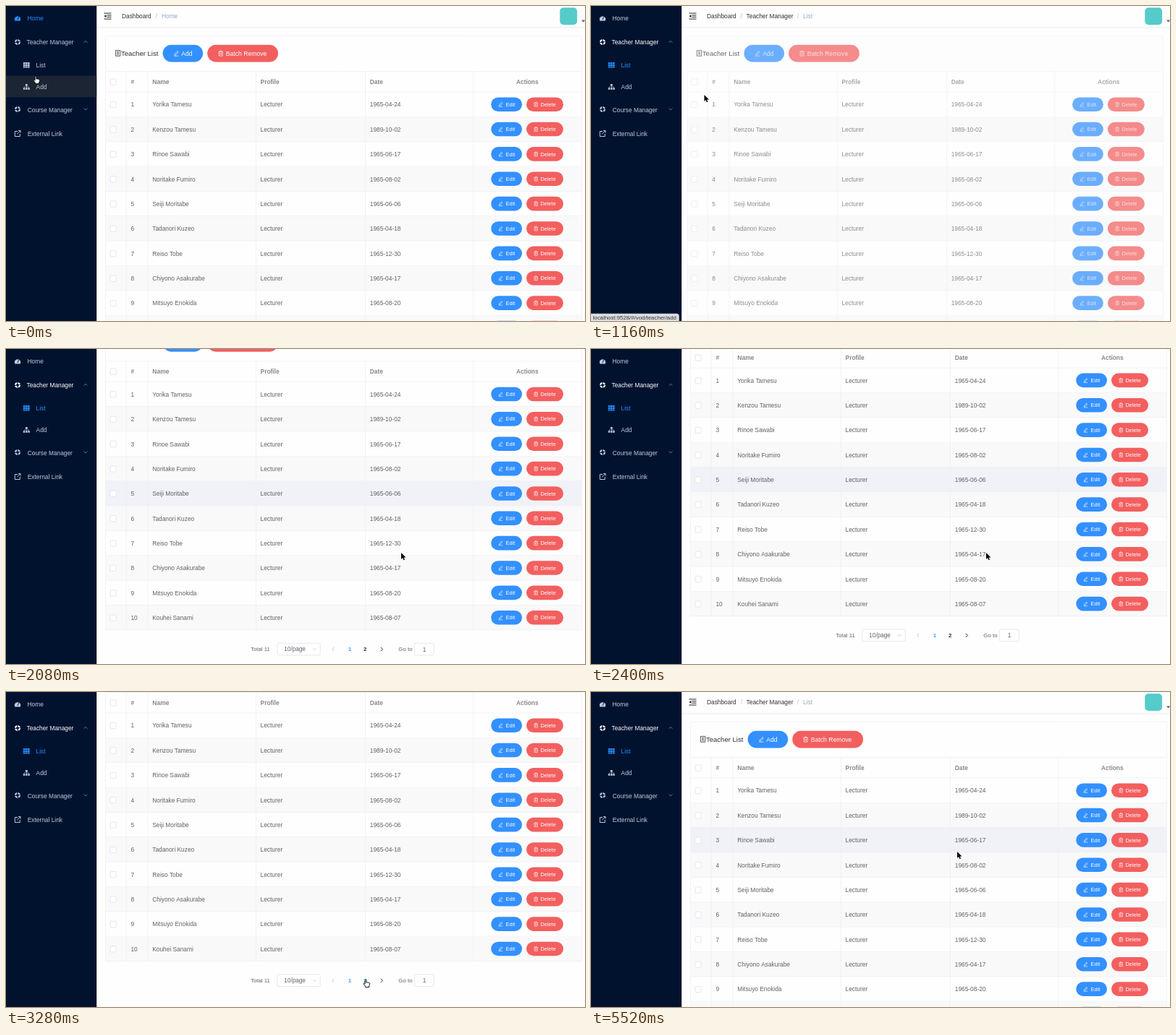
Recreate the animation shown at these times as an HTML page with a canvas. Size 800 px wide and 436 px high, loop 5.56 s.

```html
<!DOCTYPE html>
<html lang="en">
<head>
<meta charset="utf-8">
<title>Teacher list</title>
<style>
html, body { margin: 0; width: 800px; height: 436px; overflow: hidden; background: #fefefe; }
canvas { display: block; width: 800px; height: 436px; }
</style>
</head>
<body>
<canvas id="stage"></canvas>
<script>
const stage = document.getElementById('stage');
const g = stage.getContext('2d');
const ratio = window.devicePixelRatio || 1;
stage.width = 800 * ratio;
stage.height = 436 * ratio;

const LOOP = 5560;
const BLUE = '#3390ff', RED = '#f35f5f', ACTIVE = '#2490ff';
const MENU = '#01122f', MENU_HOVER = '#1b2533', MENU_TEXT = '#bfcbd9';
const LINE = '#ebeef5', BODY = '#606266', MUTED = '#97a8be', DARK = '#303133';
const ROW_TOP = 119.3, ROW_H = 34.36;
const CLICK_MENU = 450, FADE = 500, SHIFT = 17.9;
const PAGE2_CLICK = 3440, PAGE2_READY = 3560, PAGE1_CLICK = 5010, PAGE1_READY = 5110;
const SCROLL_START = 1850, SCROLL_IDLE = 2440;

const people = [
  ['Yorika Tamesu', '1965-04-24'], ['Kenzou Tamesu', '1989-10-02'],
  ['Rinoe Sawabi', '1965-06-17'], ['Noritake Fumiro', '1965-08-02'],
  ['Seiji Moritabe', '1965-06-06'], ['Tadanori Kuzeo', '1965-04-18'],
  ['Reiso Tobe', '1965-12-30'], ['Chiyono Asakurabe', '1965-04-17'],
  ['Mitsuyo Enokida', '1965-08-20'], ['Kouhei Sanami', '1965-08-07'],
  ['Wataru Ikezomi', '1965-04-26']
];

// Keyframes: time, then values.
const cursorKeys = [
  [0, 41, 97], [300, 48, 86], [1000, 48, 86], [1480, 462, 227], [1720, 546, 282],
  [2440, 546, 282], [2800, 505, 402], [3080, 497, 398], [3600, 497, 398],
  [4200, 473, 178], [5160, 473, 178], [5520, 506, 221]
];
const scrollKeys = [[SCROLL_START, 0], [2180, 94], [2280, 94], [2620, 90]];

const icons = {
  gauge: 'M-4 3.4A4.5 4.5 0 1 1 4 3.4Z',
  ring: 'M3 0A3 3 0 1 1 -3 0A3 3 0 1 1 3 0',
  grid: 'M-4.5-4h2.7v2.2h-2.7zM-1.4-4h2.7v2.2h-2.7zM1.7-4h2.7v2.2h-2.7z' +
    'M-4.5-1.3h2.7v2.2h-2.7zM-1.4-1.3h2.7v2.2h-2.7zM1.7-1.3h2.7v2.2h-2.7z' +
    'M-4.5 1.4h2.7v2.2h-2.7zM-1.4 1.4h2.7v2.2h-2.7zM1.7 1.4h2.7v2.2h-2.7z',
  tree: 'M-1.4-4h2.8v2.8h-2.8zM-4.5 1.3h2.5v2.5h-2.5zM-1.2 1.3h2.5v2.5h-2.5zM2 1.3h2.5v2.5h-2.5z' +
    'M-.3-1.2h.6v2.5h-.6zM-3.5-.3h7v.6h-7zM-3.5-.3h.6v1.6h-.6zM2.9-.3h.6v1.6h-.6z',
  link: 'M0-3H-3.7V4H3.3V.5M1-4H4V-1M4-4L-.7 .7',
  fold: 'M-5-4H5M-1-1.3H5M-1 1.3H5M-5 4H5',
  foldTip: 'M-5 0l3-2v4z',
  edit: 'M-2.2 1L1.8-3.4L3.3-2L-.7 2.3L-2.6 2.8ZM-3.4 4H3.6',
  trash: 'M-3.5-2.4H3.5M-1.2-2.4V-3.8H1.2V-2.4M-2.7-2.4V3.8H2.7V-2.4M-.8-.6V2M.8-.6V2',
  doc: 'M-3.2-3.9H3.2V3.9H-3.2ZM-1.6-1.8H1.6M-1.6 0H1.6M-1.6 1.8H1.6',
  up: 'M-2.5 1.2L0-1.2L2.5 1.2', down: 'M-2.5-1.2L0 1.2L2.5-1.2',
  left: 'M1.2-2.6L-1.4 0L1.2 2.6', right: 'M-1.2-2.6L1.4 0L-1.2 2.6',
  caret: 'M-2.5-1.4H2.5L0 1.6Z',
  arrow: 'M0 0V9L2.1 7.1L3.5 10.2L5 9.5L3.6 6.5H6.5Z',
  hand: 'M-.9 .7C-.9-.3 .9-.3 .9 .7V4L2.4 3.9L3.9 4.3L5.2 4.9C6 5.4 5.6 7.2 4.6 9V10.6H-.4V9.4' +
    'L-2.9 6.2C-3.4 5.3-2.3 4.7-1.7 5.4L-.9 6.2Z'
};
for (const k in icons) icons[k] = new Path2D(icons[k]);

const clamp = v => Math.min(1, Math.max(0, v));

function track(keys, t) {
  const i = keys.findIndex(k => k[0] > t);
  if (i === 0) return keys[0].slice(1);
  if (i < 0) return keys[keys.length - 1].slice(1);
  const a = keys[i - 1], b = keys[i];
  const p = (t - a[0]) / (b[0] - a[0]), s = p * p * (3 - 2 * p);
  return a.slice(1).map((v, j) => v + (b[j + 1] - v) * s);
}

// CSS "ease", cubic-bezier(.25, .1, .25, 1).
function ease(x) {
  x = clamp(x);
  let lo = 0, hi = 1, u = 0.5;
  const bez = (p, q) => 3 * p * u * (1 - u) ** 2 + 3 * q * u * u * (1 - u) + u ** 3;
  for (let i = 0; i < 20; i++) {
    u = (lo + hi) / 2;
    if (bez(0.25, 0.25) < x) lo = u; else hi = u;
  }
  return bez(0.1, 1);
}

function text(s, x, y, color = BODY, size = 8.33, weight = '', align = 'left') {
  g.font = `${weight} ${size}px "Liberation Sans", Arial, sans-serif`;
  g.textAlign = align;
  g.fillStyle = color;
  g.fillText(s, x, y + size * 0.36);
}

function icon(name, x, y, color, { scale = 1, fill = false, width = 0.8, dash = [] } = {}) {
  g.save();
  g.translate(x, y);
  g.scale(scale, scale);
  g.fillStyle = g.strokeStyle = color;
  g.lineWidth = width;
  g.setLineDash(dash);
  if (fill) g.fill(icons[name]); else g.stroke(icons[name]);
  g.restore();
}

function rect(x, y, w, h, color) {
  g.fillStyle = color;
  g.fillRect(x, y, w, h);
}

function box(x, y, w, h, r, fill, stroke) {
  g.beginPath();
  g.roundRect(x, y, w, h, r);
  if (fill) { g.fillStyle = fill; g.fill(); }
  if (stroke) { g.strokeStyle = stroke; g.lineWidth = 0.7; g.stroke(); }
}

function button(label, glyph, x, y, w, h, color, iconX, textX, size) {
  box(x, y - h / 2, w, h, h / 2, color);
  icon(glyph, iconX, y, '#fff', { scale: size / 9.5 });
  text(label, textX, y, '#fff', size);
}

function withAlpha(alpha, dx, draw) {
  g.save();
  g.globalAlpha = alpha;
  g.translate(dx, 0);
  draw();
  g.restore();
}

function drawNavbar(t) {
  rect(125, 29.3, 675, 0.8, '#e9ebee');
  rect(125, 30.1, 675, 1.4, '#f8f9fa');
  icon('fold', 140.5, 14, '#222', { width: 1.1 });
  icon('foldTip', 140.5, 14, '#222', { fill: true });
  box(765.3, 2.2, 23.8, 23.8, 5, '#55cbca');
  icon('caret', 797.6, 21, '#5a5e66', { fill: true });

  const slash = x => text('/', x, 14.5, '#b4bac4', 8.33, '', 'center');
  text('Dashboard', 160, 14.5, DARK);
  slash(208);
  if (t < CLICK_MENU) {
    text('Home', 215, 14.5, MUTED);
    return;
  }
  const e = ease((t - CLICK_MENU) / FADE), leaving = t < CLICK_MENU + FADE;
  withAlpha(e, 11.9 * (1 - e), () => {
    text('Teacher Manager', 214.6, 14.5, DARK);
    slash(286);
    text('List', 293, 14.5, MUTED);
    if (leaving) slash(313);
  });
  if (leaving) withAlpha(1 - e, 11.9 * e, () => text('Home', 309, 14.5, MUTED));
}

function drawRow(id, i, hovered) {
  const top = ROW_TOP + i * ROW_H, y = top + 17.2;
  const [name, date] = people[id];
  if (hovered || i % 2) rect(137.5, top, 658, ROW_H, hovered ? '#f0f2f8' : '#f9f9f9');
  rect(137.5, top + ROW_H - 0.7, 658, 0.7, LINE);
  box(144, y - 4, 8.2, 8.2, 1, '#fff', '#dcdfe6');
  text(id + 1, 172.4, y);
  text(name, 202.3, y);
  text('Lecturer', 351.6, y);
  text(date, 502.8, y);
  button('Edit', 'edit', 670.2, y - 0.3, 42.8, 19.6, BLUE, 683.3, 690.6, 7.3);
  button('Delete', 'trash', 719, y - 0.3, 51, 19.6, RED, 732.2, 738.6, 7.3);
}

function drawPager(s) {
  const y = s.pagerY, on = '#409eff', ink = DARK, off = '#c0c4cc';
  const color = n => n === s.active || n === s.pagerHover ? on : ink;
  text('Total 11', 338.2, y, BODY, 7.74);
  box(375, y - 8.3, 59.2, 16.6, 2, '#fff', '#dcdfe6');
  text('10/page', 384.3, y, BODY, 8.2);
  icon('down', 426.5, y, off, { scale: 0.9 });
  icon('left', 452, y, s.active === 1 ? off : ink, { width: 1 });
  text('1', 475, y, color(1), 7.9, 'bold', 'center');
  text('2', 496.2, y, color(2), 7.9, 'bold', 'center');
  icon('right', 519, y, s.active === 2 ? off : ink, { width: 1 });
  text('Go to', 542.3, y, BODY, 7.9);
  box(564.4, y - 8.3, 26.8, 16.6, 2, '#fff', '#dcdfe6');
  text(s.active, 578, y, BODY, 8.33, '', 'center');
}

function drawList(s) {
  box(137.5, 41.3, 658, 49.4, 1.5, '#fefefe', LINE);
  icon('doc', 154.6, 65.3, DARK);
  text('Teacher List', 159, 65.5, DARK, 9.52);
  button('Add', 'edit', 216.6, 65.6, 55.5, 23.6, BLUE, 235.2, 242.3, 8.5);
  button('Batch Remove', 'trash', 278.2, 65.6, 97.8, 23.6, RED, 296.7, 303.8, 8.65);

  const bottom = ROW_TOP + s.rows.length * ROW_H;
  s.rows.forEach((id, i) => drawRow(id, i, i === s.hover));
  rect(137.5, ROW_TOP - 0.7, 658, 0.7, LINE);
  for (const x of [137.3, 165.8, 195.6, 345.1, 496.2, 645.5, 795.2])
    rect(x, 90.8, 0.7, bottom - 90.8, LINE);

  box(144, 101, 8.2, 8.2, 1, '#fff', '#dcdfe6');
  const head = '#85888e';
  text('#', 172.4, 105, head, 8.33, 'bold');
  text('Name', 202.3, 105, head, 8.5, 'bold');
  text('Profile', 351.6, 105, head, 8.33, 'bold');
  text('Date', 502.8, 105, head, 8.33, 'bold');
  text('Actions', 720.3, 105, head, 8.33, 'bold', 'center');
  drawPager(s);
}

function drawContent(t, s) {
  const leave = ease((t - CLICK_MENU) / FADE);
  const enter = ease((t - CLICK_MENU - FADE) / FADE);
  const arriving = t >= CLICK_MENU + FADE;
  withAlpha(arriving ? enter : 1 - leave, SHIFT * (arriving ? enter - 1 : leave), () => drawList(s));
}

function drawMenu(t, s) {
  const onList = t >= CLICK_MENU;
  const home = onList ? MENU_TEXT : ACTIVE, list = onList ? ACTIVE : MENU_TEXT;
  const parent = onList ? '#fff' : MENU_TEXT;
  const ring = { width: 2.2, dash: [3.5, 1.21] };
  rect(0, 0, 125.2, 436, MENU);
  if (s.menuHover) rect(0, s.menuHover === 'list' ? 66.6 : 96.4, 125.2, 29.8, MENU_HOVER);

  icon('gauge', 16, 17.2, home, { fill: true, scale: 0.95 });
  g.strokeStyle = MENU;
  g.lineWidth = 0.9;
  g.beginPath();
  g.moveTo(16, 19);
  g.lineTo(17.6, 15);
  g.stroke();
  text('Home', 29.6, 17, home);
  icon('ring', 16, 50, parent, ring);
  text('Teacher Manager', 28.5, 50.3, parent);
  icon('up', 110, 49.5, '#7d8796');
  icon('grid', 28.3, 82, list, { fill: true });
  text('List', 41.6, 82.3, list);
  icon('tree', 28.3, 112, MENU_TEXT, { fill: true });
  text('Add', 41.6, 112.3, MENU_TEXT);
  icon('ring', 16, 143, MENU_TEXT, ring);
  text('Course Manager', 29.8, 143.8, MENU_TEXT);
  icon('down', 110, 142.8, '#7d8796');
  icon('link', 16, 176.5, MENU_TEXT, { width: 1 });
  text('External Link', 29.8, 177.3, MENU_TEXT);
}

function drawStatus(t) {
  if (t < 80 || t > 1600) return;
  const target = t < 100 || t > 1150 ? 'add' : 'list';
  box(-1, 426, target === 'add' ? 122.5 : 120, 11, [0, 3, 0, 0], '#dcdee0', '#b9bcc0');
  text('localhost:9528/#/vod/teacher/' + target, 2.6, 431.5, '#333', 7.84);
}

function drawProgress(t) {
  const p = (t - CLICK_MENU) / 210;
  if (p < 0 || t > 900) return;
  withAlpha(1 - clamp((t - 660) / 160), 0, () => rect(0, 0, 800 * clamp(p), 1.2, '#29d'));
}

function drawCursor([x, y], hand) {
  g.save();
  g.translate(x, y);
  g.lineJoin = 'round';
  g.lineWidth = hand ? 0.9 : 1.3;
  g.strokeStyle = hand ? '#000' : '#fff';
  g.fillStyle = hand ? '#fff' : '#000';
  const shape = icons[hand ? 'hand' : 'arrow'];
  if (hand) { g.fill(shape); g.stroke(shape); } else { g.stroke(shape); g.fill(shape); }
  g.restore();
}

function stateAt(t) {
  const cursor = track(cursorKeys, t), [x, y] = cursor;
  const second = t >= PAGE2_READY && t < PAGE1_READY;
  const rows = second ? [10] : [0, 1, 2, 3, 4, 5, 6, 7, 8, 9];
  const scrollAt = u => u < PAGE2_READY ? track(scrollKeys, u)[0] : 0;
  const scroll = scrollAt(t);

  // Row highlight trails the pointer and stays put while scrolling.
  const seen = t > SCROLL_START && t < SCROLL_IDLE ? SCROLL_START : Math.max(0, t - 90);
  const [hx, hy] = track(cursorKeys, seen);
  const hover = hx > 137 ? Math.floor((hy + scrollAt(seen) - ROW_TOP) / ROW_H) : -1;

  const pagerY = ROW_TOP + rows.length * ROW_H + 26.3;
  const near = cx => Math.abs(x - cx) < 9 && Math.abs(y + scroll - pagerY) < 9;
  const pagerHover = near(475) ? 1 : near(496) ? 2 : 0;
  const inMenu = x < 125;
  return {
    cursor, rows, scroll, hover, pagerY, pagerHover,
    active: t >= PAGE2_CLICK && t < PAGE1_CLICK ? 2 : 1,
    menuHover: inMenu && y > 66.6 && y < 126.2 ? (y < 96.4 ? 'list' : 'add') : '',
    hand: inMenu || pagerHover > 0
  };
}

function frame() {
  const t = performance.now() % LOOP, s = stateAt(t);
  g.setTransform(ratio, 0, 0, ratio, 0, 0);
  rect(0, 0, 800, 436, '#fefefe');
  g.save();
  g.translate(0, -s.scroll);
  drawNavbar(t);
  drawContent(t, s);
  g.restore();
  drawMenu(t, s);
  drawProgress(t);
  drawStatus(t);
  drawCursor(s.cursor, s.hand);
  requestAnimationFrame(frame);
}
frame();
</script>
</body>
</html>
```
